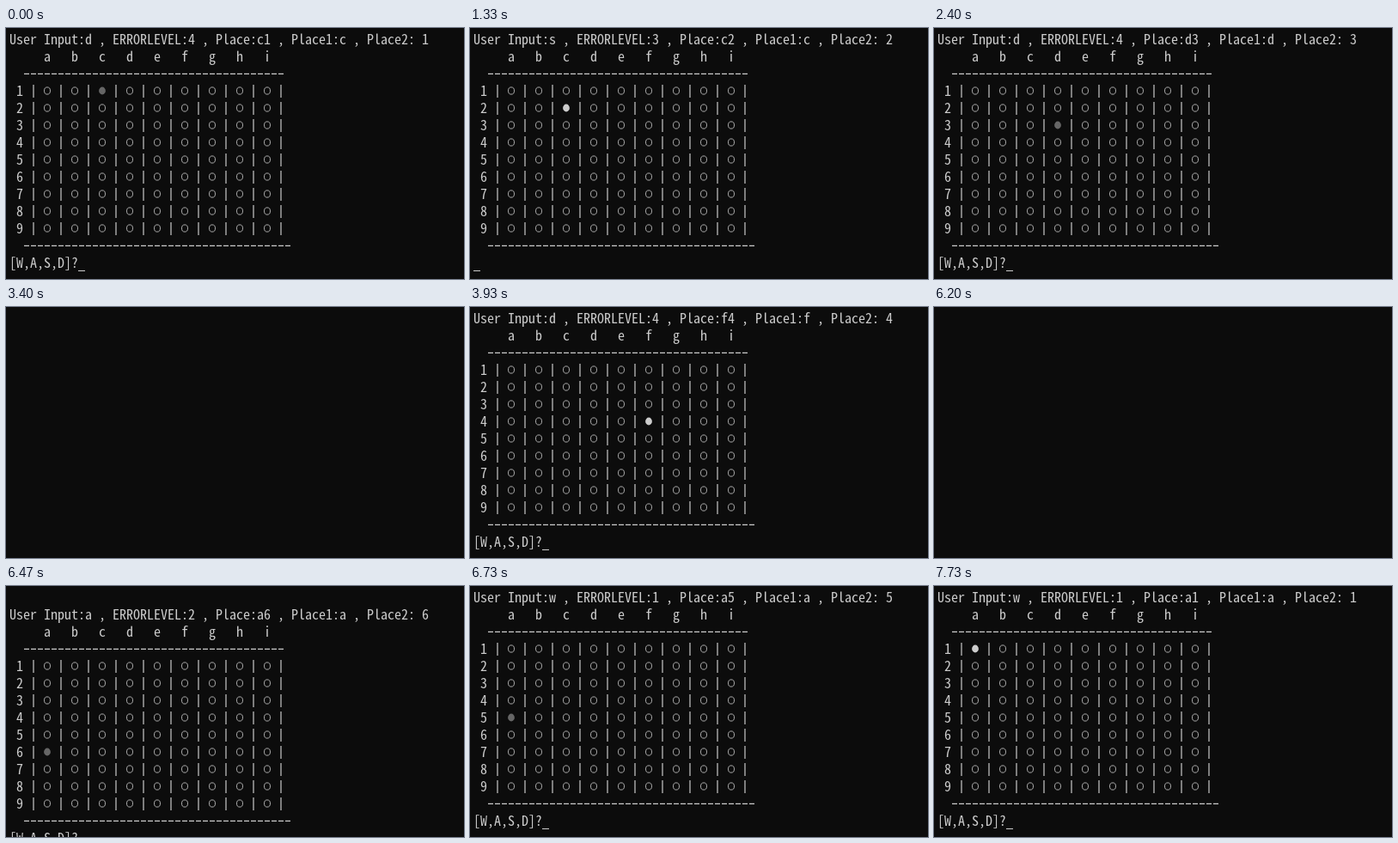
An HTML page that plays this animation: 533x292 px, repeating every 7.94 s.

```html
<!DOCTYPE html>
<html lang="en">
<head>
<meta charset="utf-8">
<title>Terminal grid</title>
<style>
  html, body { margin: 0; width: 100%; height: 100%; overflow: hidden; background: #0c0c0c; }
  svg { display: block; width: 100%; height: 100%; }
  text {
    font-family: "Noto Sans Mono CJK SC", "Noto Sans Mono CJK JP", "Noto Sans Mono CJK KR", "DejaVu Sans Mono", monospace;
    fill: #ccc;
    text-anchor: middle;
    white-space: pre;
  }
  .line { fill: none; stroke: #ccc; stroke-width: 1.2; }
  .dash { stroke-dasharray: 6 2; }
  .ring { fill: none; stroke: #bbb; stroke-width: .9; }
  .gone { visibility: hidden; }
</style>
</head>
<body>
<svg viewBox="0 0 533 292">
  <g id="screen">
    <g id="board"></g>
    <ellipse id="dot" rx="3.9" ry="4.4"/>
    <g id="prompt"></g>
  </g>
  <rect id="cursor" y="282" width="8" height="1" fill="#ccc"/>
</svg>
<script>
const LOOP = 7940, CHAR = 8, ROW = 20, LEFT = 4;
const COLS = 'abcdefghi', KEYS = 'wasd';
const $ = id => document.getElementById(id);
const screenBox = $('screen'), board = $('board'), prompt = $('prompt');
const dot = $('dot'), cursor = $('cursor');

// time, cell, last key, drawing stage
const MOVES = [
  [0, 'c1', 'd'],
  [1330, 'c2', 's', 'waiting'],
  [1400, 'c2', 's'],
  [1930, 'c3', 's'],
  [2400, 'd3', 'd'],
  [3000, 'e3', 'd'],
  [3400, 'e3', 'd', 'blank'],
  [3470, 'e4', 's'],
  [3930, 'f4', 'd'],
  [4270, 'f5', 's'],
  [4600, 'g5', 'd', 'waiting'],
  [4670, 'g5', 'd'],
  [4930, 'g6', 's'],
  [5400, 'f6', 'a'],
  [5930, 'e6', 'a'],
  [6000, 'd6', 'a'],
  [6070, 'c6', 'a'],
  [6130, 'b6', 'a', 'waiting'],
  [6200, 'b6', 'a', 'blank'],
  [6330, 'a6', 'a', 'lowered'],
  [6670, 'a6', 'a', 'blank'],
  [6730, 'a5', 'w'],
  [7070, 'a4', 'w'],
  [7330, 'a3', 'w'],
  [7470, 'a2', 'w', 'waiting'],
  [7530, 'a2', 'w'],
  [7730, 'a1', 'w']
];
const BLINKS = [1070, 2130, 3200, 4270, 5330, 6470, 7470];

const charX = i => LEFT + (i + .5) * CHAR;
const midY = row => 13 + row * ROW;

function add(parent, tag, attrs) {
  const el = document.createElementNS('http://www.w3.org/2000/svg', tag);
  for (const name in attrs) el.setAttribute(name, attrs[name]);
  return parent.appendChild(el);
}

// Size at which one character fills one terminal cell
function cellFontSize() {
  const ctx = document.createElement('canvas').getContext('2d');
  const probe = add(board, 'text', {});
  ctx.font = '16px ' + getComputedStyle(probe).fontFamily;
  probe.remove();
  return 16 * CHAR / ctx.measureText('0').width;
}
const fontSize = cellFontSize();

function write(parent, str, row, col, step = 1) {
  const x = [...str].map((c, i) => charX(col + i * step)).join(' ');
  const el = add(parent, 'text', { x, y: midY(row) + 6, 'font-size': fontSize });
  el.textContent = str;
  return el;
}

function dashes(row, count) {
  const x = LEFT + 2 * CHAR + 1, y = midY(row) + .3;
  add(board, 'path', { class: 'line dash', d: `M${x} ${y}h${count * CHAR - 2}` });
}

const status = write(board, ' '.repeat(61), 0, 0);
write(board, COLS, 1, 5, 4);
dashes(2, 38);
dashes(12, 39);
const rings = {};
for (let n = 1; n <= 9; n++) {
  const row = n + 2, y = midY(row);
  write(board, String(n), row, 1);
  for (let k = 0; k < 10; k++)
    add(board, 'path', { class: 'line', d: `M${charX(3 + 4 * k)} ${y - 7}v15` });
  [...COLS].forEach((c, k) => {
    rings[c + n] = add(board, 'ellipse', { class: 'ring', cx: charX(5 + 4 * k), cy: y, rx: 3.5, ry: 4.1 });
  });
}
write(prompt, '[W,A,S,D]?', 13, 0);

let shown = null, active = null;
function show(move) {
  if (move === shown) return;
  shown = move;
  const [, cell, key, stage] = move, [col, num] = cell;
  status.textContent = `User Input:${key} , ERRORLEVEL:${KEYS.indexOf(key) + 1} , Place:${cell} , Place1:${col} , Place2: ${num}`;
  if (active) active.classList.remove('gone');
  active = rings[cell];
  active.classList.add('gone');
  dot.setAttribute('cx', active.getAttribute('cx'));
  dot.setAttribute('cy', active.getAttribute('cy'));
  screenBox.setAttribute('display', stage === 'blank' ? 'none' : 'inline');
  screenBox.setAttribute('transform', `translate(0 ${stage === 'lowered' ? ROW : 0})`);
  prompt.setAttribute('display', stage === 'waiting' ? 'none' : 'inline');
  cursor.setAttribute('x', LEFT + (stage === 'waiting' ? 0 : 10 * CHAR));
}

function frame() {
  const t = performance.now() % LOOP;
  const move = MOVES.filter(m => m[0] <= t).pop();
  show(move);
  const bright = BLINKS.filter(b => b <= t).length % 2;
  dot.setAttribute('fill', bright ? '#ccc' : '#666');
  const hidden = (t >= 530 && t < 1070) || move[3] === 'blank' || move[3] === 'lowered';
  cursor.setAttribute('display', hidden ? 'none' : 'inline');
  requestAnimationFrame(frame);
}
frame();
</script>
</body>
</html>
```
